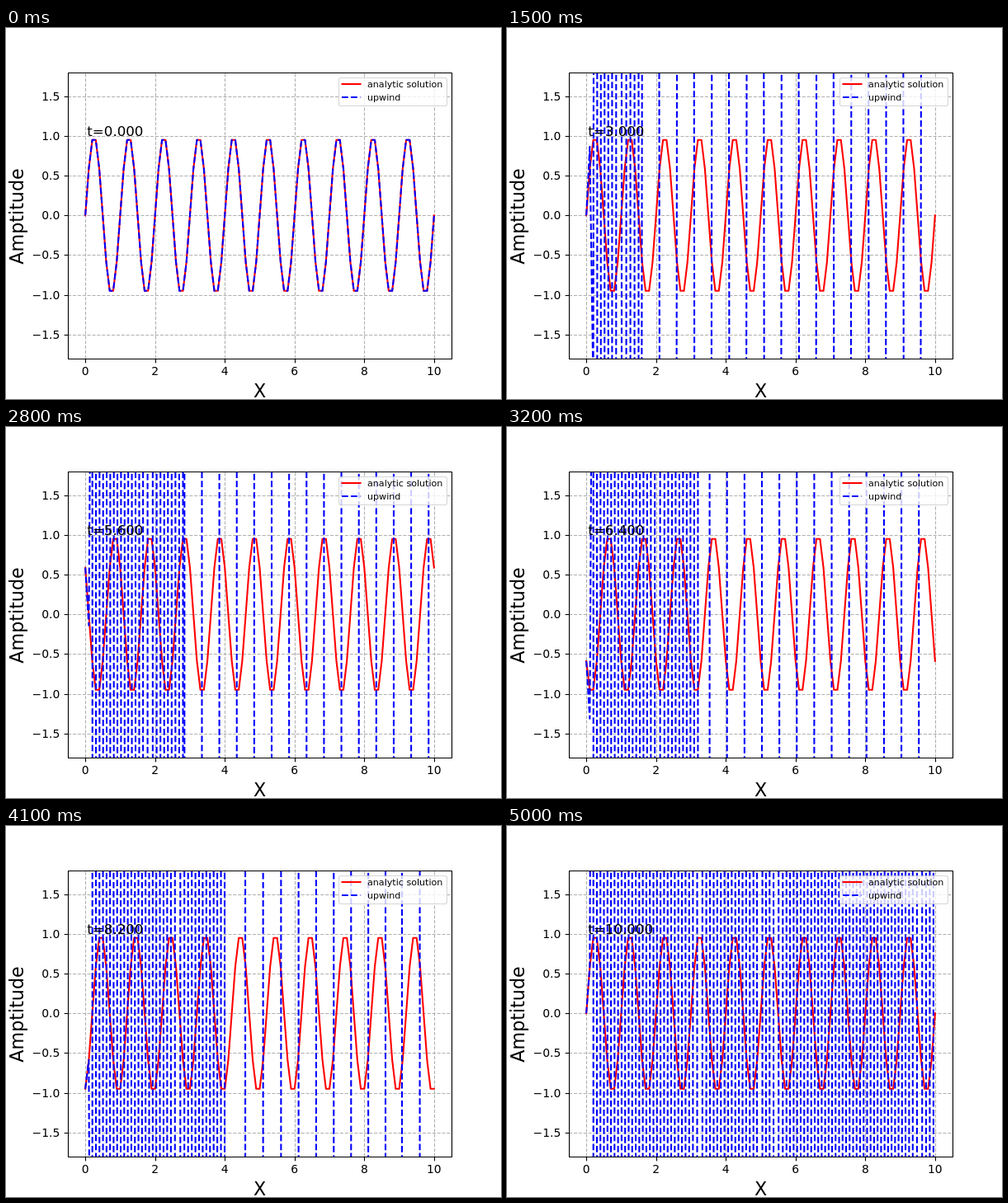
These frames come from a looping animation (600x450 px, 5.1 s). An HTML page with a canvas:

```html
<!DOCTYPE html>
<html lang="en">
<head>
<meta charset="utf-8">
<title>Upwind scheme</title>
<style>
  html, body { margin: 0; width: 100%; height: 100%; overflow: hidden; background: #fff; }
  canvas { display: block; }
</style>
</head>
<body>
<canvas id="plot" width="600" height="450"></canvas>
<script>
const ctx = document.getElementById('plot').getContext('2d');
const PT = 100 / 72;
const BOX = { left: 75, top: 54, right: 540, bottom: 401 };
const STEPS = 51, STEP_MS = 100, CELLS = 100, DX = 0.1, DT = 0.2;

const px = x => 75 + (x + 0.5) * 465 / 11;
const py = y => 227.25 - y * 96.25;
const snap = v => Math.floor(v + 0.5) + 0.5;
const wave = (x, t) => Math.sin(2 * Math.PI * (x - t));
const sample = t => Array.from({ length: CELLS + 1 }, (_, j) => wave(j * DX, t));

// First-order upwind at Courant number 2: unstable, with an exact inflow value.
const upwind = [sample(0)];
for (let n = 1; n < STEPS; n++) {
  const u = upwind[n - 1];
  upwind.push(u.map((v, j) => j ? v - DT / DX * (v - u[j - 1]) : wave(0, n * DT)));
}

function stroke(color, width, dashed) {
  ctx.strokeStyle = color;
  ctx.lineWidth = width * PT;
  ctx.setLineDash(dashed ? [3.7 * width * PT, 1.6 * width * PT] : []);
  ctx.lineCap = dashed ? 'butt' : 'square';
  ctx.lineJoin = 'round';
  ctx.stroke();
}

function line(x0, y0, x1, y1, color, width, dashed) {
  ctx.beginPath();
  ctx.moveTo(x0, y0);
  ctx.lineTo(x1, y1);
  stroke(color, width, dashed);
}

function text(str, x, y, size, align = 'left') {
  ctx.font = `${size * PT}px "DejaVu Sans", sans-serif`;
  ctx.textAlign = align;
  ctx.fillStyle = '#000';
  ctx.fillText(str, x, y);
}

// Segments are cut at the stage edge, so dashes start anew at every re-entry.
function curve(values, color, dashed) {
  const clamp = y => Math.max(-1, Math.min(451, y));
  ctx.beginPath();
  for (let j = 1; j < values.length; j++) {
    const x0 = px((j - 1) * DX), x1 = px(j * DX);
    const y0 = py(values[j - 1]), y1 = py(values[j]);
    const a = clamp(y0), b = clamp(y1);
    if (a === b && a !== y0) continue;
    const xAt = y => y1 === y0 ? x0 : x0 + (x1 - x0) * (y - y0) / (y1 - y0);
    if (j === 1 || a !== y0) ctx.moveTo(a === y0 ? x0 : xAt(a), a);
    ctx.lineTo(b === y1 ? x1 : xAt(b), b);
  }
  stroke(color, 1.5, dashed);
}

function axes() {
  for (let x = 0; x <= 10; x += 2) {
    const sx = snap(px(x));
    line(sx, BOX.bottom, sx, BOX.top, '#b0b0b0', 0.8, true);
    line(sx, 402, sx, 405.8, '#000', 0.8);
    text(String(x), px(x), 421, 10, 'center');
  }
  for (let y = -1.5; y <= 1.5; y += 0.5) {
    const sy = snap(py(y));
    line(BOX.left, sy, BOX.right, sy, '#b0b0b0', 0.8, true);
    line(71.2, sy, 75, sy, '#000', 0.8);
    text(y.toFixed(1).replace('-', '\u2212'), 65.3, Math.round(py(y) + 5), 10, 'right');
  }
  text('X', 307.5, 448, 16, 'center');
  ctx.save();
  ctx.translate(21, 228.5);
  ctx.rotate(-Math.PI / 2);
  text('Amptitude', 0, 0, 16, 'center');
  ctx.restore();
}

function legend() {
  ctx.beginPath();
  ctx.roundRect(403.5, 60.5, 131, 34, 2.2);
  ctx.fillStyle = 'rgba(255,255,255,0.8)';
  ctx.fill();
  stroke('rgba(204,204,204,0.8)', 0.8);
  line(407.5, 68, 429.5, 68, '#f00', 1.5);
  line(407, 84, 429.5, 84, '#00f', 1.5, true);
  text('analytic solution', 438, 72, 8);
  text('upwind', 438, 88, 8);
}

function draw(step) {
  const t = step * DT;
  ctx.fillStyle = '#fff';
  ctx.fillRect(0, 0, 600, 450);
  axes();
  ctx.save();
  ctx.beginPath();
  ctx.rect(BOX.left, BOX.top, BOX.right - BOX.left, BOX.bottom - BOX.top);
  ctx.clip();
  curve(sample(t), '#f00', false);
  curve(upwind[step], '#00f', true);
  ctx.restore();
  ctx.beginPath();
  ctx.rect(75.5, 54.5, 465, 347);
  stroke('#000', 0.8);
  text('t=' + t.toFixed(3), 98.3, 131, 12);
  legend();
}

let shown = -1;
function tick() {
  const step = Math.floor(performance.now() / STEP_MS) % STEPS;
  if (step !== shown) draw(shown = step);
  requestAnimationFrame(tick);
}
tick();
</script>
</body>
</html>
```
